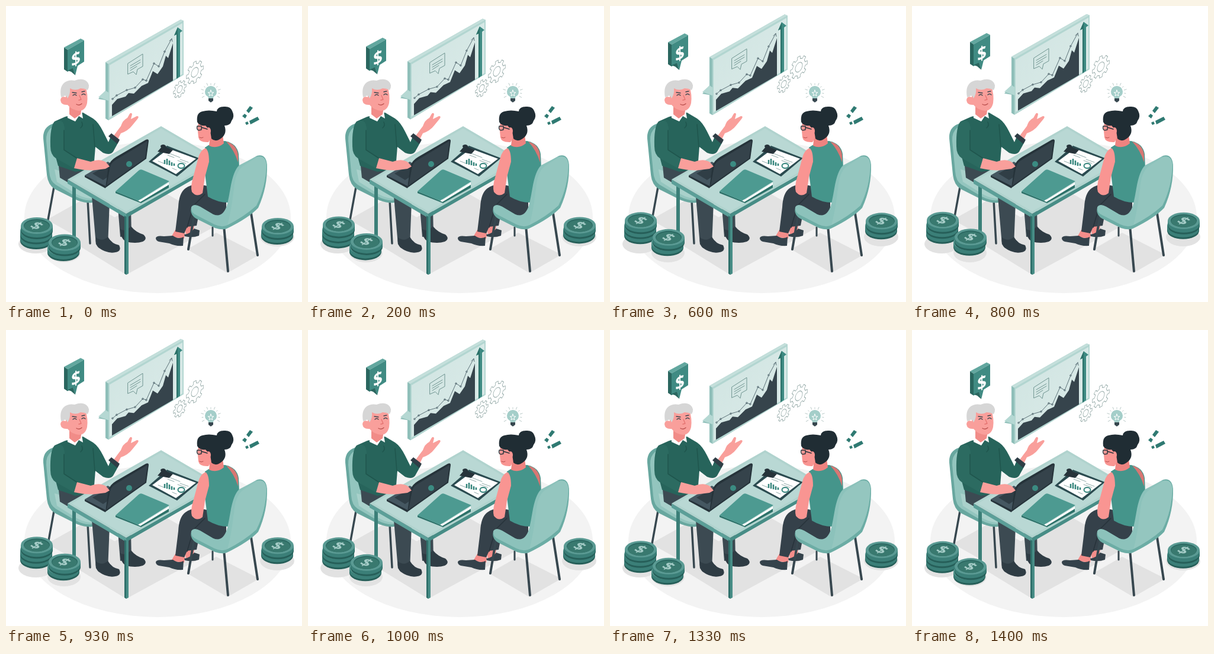
An HTML page for the animation above (1.47 s loop, 500 by 500 pixels).

```html
<!DOCTYPE html>
<html lang="en">
<head>
<meta charset="utf-8">
<title>Meeting</title>
<style>
  html, body { margin: 0; width: 100%; height: 100%; overflow: hidden; background: #fff; }
  svg { display: block; width: 100vw; height: 100vh; }
  text { font-family: "Open Sans", Arial, sans-serif; font-weight: 700; text-anchor: middle; }
  .line { fill: none; stroke-linecap: round; stroke-linejoin: round; }
</style>
</head>
<body>
<svg viewBox="0 0 500 500">
  <defs>
    <g id="coin">
      <path d="M-27 0v9a27 14 0 0 0 54 0v-9z" fill="#265f59"/>
      <path d="M-27 0v6a27 14 0 0 0 54 0v-6z" fill="#3b7f78"/>
      <ellipse rx="27" ry="14" fill="#5a9a93"/>
      <ellipse rx="22" ry="11" fill="#2b6962"/>
      <ellipse cy="1" rx="21" ry="10" fill="#39796f"/>
    </g>
    <g id="coinTop">
      <use href="#coin"/>
      <text transform="matrix(.95 .42 -.75 .55 0 0)" y="9" font-size="25" fill="#a3cbc6">$</text>
    </g>
    <linearGradient id="panel" x2="1" y2="1">
      <stop stop-color="#cfe4e1"/><stop offset="1" stop-color="#dcebe9"/>
    </linearGradient>
  </defs>

  <!-- floor and shadows -->
  <ellipse cx="256" cy="357" rx="225" ry="128" fill="#f3f3f3"/>
  <g fill="#e2e2e2">
    <path d="M69 361L130 327 202 367 142 402z"/>
    <path d="M112 398L262 312 361 368 203 454z"/>
    <path d="M306 411L355 383 428 420 374 451z"/>
    <ellipse cx="50" cy="402" rx="29" ry="16"/>
    <ellipse cx="98" cy="417" rx="28" ry="16"/>
    <ellipse cx="458" cy="390" rx="29" ry="16"/>
  </g>

  <!-- left chair -->
  <g class="line" stroke="#37474f" stroke-width="3.500">
    <path d="M81 306L71 361"/><path d="M138 328L142 401"/>
  </g>
  <path d="M63 224Q62 208 74 201L90 194 121 276 146 312V332Q137 334 120 328L82 309Q71 302 69 285z" fill="#68a79f"/>
  <path d="M68 228Q67 213 77 205L92 198 121 276 146 314V328Q134 330 118 322L84 302Q74 296 73 280z" fill="#93c5be"/>
  <path d="M82 276L120 286 146 312V326Q126 324 110 312L86 297z" fill="#a9d1cb"/>

  <!-- man: legs -->
  <path d="M89 270L150 276 176 306 172 405 152 403 145 322 108 300 91 290z" fill="#3c4a52"/>
  <path d="M189 340H211L212 388 193 390z" fill="#3c4a52"/>
  <path d="M152 391Q163 399 172 390Q179 402 191 404Q196 414 185 416Q171 419 156 408Q150 402 152 391z" fill="#2f3c44"/>
  <path d="M193 377Q203 382 211 372Q219 382 232 386Q240 393 231 398Q219 402 202 398Q193 392 193 377z" fill="#2f3c44"/>

  <!-- man: torso, arms, head -->
  <path d="M100 187L130 180 147 190Q156 196 164 212L173 230 177 220 191 228 181 246Q176 253 164 248L151 238 149 262 146 276 117 280 88 270 80 240Q73 205 82 195z" fill="#27645b"/>
  <path d="M147 200L150 238M128 196Q131 202 126 206" class="line" stroke="#1f554d" stroke-width="1.500"/>
  <path d="M104 181L112 172 128 178 130 190 123 186 117 195 104 189z" fill="#fff"/>
  <path d="M107 160L128 171 126 183 116 190 107 183z" fill="#f18c88"/>
  <path d="M101 139Q104 134 134 135Q139 150 137 164Q134 177 123 177Q110 175 104 167Q93 168 92 159Q93 151 101 154z" fill="#f99f9b"/>
  <path d="M93 154Q90 137 98 130Q105 124 116 126Q128 121 136 127Q143 133 138 142Q132 139 126 139Q117 144 108 139Q109 149 104 156Q101 149 97 153z" fill="#d6d6d6"/>
  <g class="line" stroke="#39464e" stroke-width="1.300">
    <path d="M113 151Q116 148 119 151M128 150Q131 147 134 150M112 146L119 147M128 145L133 144"/>
    <path d="M124 151L127 158 123 159" stroke="#e47370"/>
    <path d="M119 166Q124 169 128 165" stroke="#b94f4d"/>
  </g>
  <path d="M180 222Q187 212 194 203Q197 193 205 189L209 182Q212 179 213 183L211 191 221 186Q226 186 222 191L213 202Q206 211 194 215L188 227z" fill="#f99f9b"/>
  <path d="M173 220L178 215 192 226 188 233z" fill="#2f3e46"/>

  <!-- table -->
  <path d="M112 304h6v94l-3 2-3-2z" fill="#3b7f78"/>
  <path d="M104 293L203 351V358L104 300z" fill="#5b9f98"/>
  <path d="M203 351L361 261V267L203 358z" fill="#478d86"/>
  <path d="M262 203L361 261 203 351 104 293z" fill="#b0d3ce"/>
  <path d="M262 207L354 261 203 347 111 293z" fill="#b9d8d4"/>
  <path d="M200 354L203 356V454L200 452z" fill="#2f706a"/>
  <path d="M203 356L207 354V452L203 454z" fill="#478d86"/>

  <!-- laptop -->
  <path d="M133 286L172 263 203 281 168 307z" fill="#455761"/>
  <path d="M133 286L168 304V308L133 289z" fill="#26333a"/>
  <path d="M146 283L172 268 188 278 164 294z" fill="#303e46"/>
  <path d="M173 270Q176 261 186 255L236 226Q241 224 241 228L237 258 168 307z" fill="#26333a"/>
  <path d="M176 271Q178 264 187 259L239 228 235 257 170 303z" fill="#35434b"/>
  <ellipse cx="208" cy="267" rx="5" ry="5" fill="#3b8b82"/>

  <!-- left arm over the keyboard -->
  <path d="M82 196Q98 188 99 208L98 243 121 258 116 275 84 257Q75 251 75 237Q74 204 82 196z" fill="#2c6b61"/>
  <path d="M98 210L98 243 121 258" class="line" stroke="#1f554d" stroke-width="1.500"/>
  <path d="M120 257L143 263Q158 257 169 264L175 271 168 275 152 277Q138 279 115 274z" fill="#f99f9b"/>

  <!-- folder -->
  <path d="M185 313L226 330 275 301V307L228 333 185 316z" fill="#2d7169"/>
  <path d="M190 312L228 327 275 298V302L227 331z" fill="#fff"/>
  <path d="M185 313L224 278Q227 275 231 277L276 296 223 329z" fill="#4d9a91"/>

  <!-- clipboard -->
  <path d="M241 263L272 236 326 257 289 288z" fill="#2b4b50"/>
  <path d="M247 262L275 241 321 258 287 284z" fill="#fff"/>
  <path d="M256 246L262 239Q259 235 265 234Q270 234 271 239L282 243 276 250z" fill="#26333a"/>
  <g class="line" stroke="#35857c" stroke-width="2">
    <path d="M268 267V260M272 268V258M276 269V261M280 270V264M284 270V266" stroke-width="2.500" stroke-linecap="butt"/>
    <ellipse cx="296" cy="270" rx="5.500" ry="4"/>
  </g>
  <path d="M276 249L294 256M273 252L284 256M290 261L304 266M294 259L308 264M257 262L267 266M281 274L288 277" class="line" stroke="#8faaa9"/>

  <!-- woman: legs and shoes -->
  <path d="M286 378H303L301 393 279 390zM301 367H318L317 382 304 386z" fill="#f48d8a"/>
  <path d="M303 308Q316 298 340 304L372 330 372 360 350 360 327 345 322 371 306 373 301 384 286 381 291 340Q292 316 303 308z" fill="#35414a"/>
  <path d="M336 318L318 336Q312 352 306 374" class="line" stroke="#27323a" stroke-width="1.500"/>
  <path d="M253 392Q254 387 267 389L282 388Q291 395 300 390L299 405Q286 406 276 401L258 398Q253 396 253 392z" fill="#34424b"/>
  <path d="M301 386Q311 385 318 376L327 379 326 388Q315 392 302 389z" fill="#34424b"/>

  <!-- woman: body -->
  <path d="M336 239Q350 229 370 228Q390 232 393 250L394 275 379 332Q359 333 341 322L336 282z" fill="#45958b"/>
  <path d="M372 229Q390 234 392 252V264Q386 244 372 229z" fill="#d87673"/>
  <path d="M345 218H366L368 232Q356 242 343 236z" fill="#ee8380"/>
  <path d="M337 240Q343 244 343 263L336 289 332 316Q322 324 314 314Q311 305 317 286L325 256Q328 244 337 240z" fill="#f99592"/>

  <!-- woman: head -->
  <path d="M326 194Q322 207 324 211L325 222Q327 231 342 230L352 213 345 190z" fill="#f99592"/>
  <path d="M323 196Q321 180 332 178Q342 175 356 178Q357 170 368 170Q379 169 382 177Q387 187 381 194Q379 202 369 202Q374 215 364 223Q354 231 347 224L345 211 337 202Q327 203 323 196z" fill="#202d34"/>
  <ellipse cx="342" cy="211" rx="4" ry="6" fill="#f99592"/>
  <path d="M323 203Q321 212 330 209V203zM330 205L340 208" class="line" stroke="#26363d" stroke-width="1.400"/>
  <path d="M327 222Q330 224 333 222" class="line" stroke="#b94f4d"/>

  <!-- right chair -->
  <g class="line" stroke="#37474f" stroke-width="4">
    <path d="M318 352L308 411M368 371L375 448M414 350L425 421"/><path d="M349 374V388" stroke-width="3"/>
  </g>
  <path d="M313 340Q317 333 328 339L350 352Q368 360 375 335 378 322 380 311Q386 278 396 269L424 253Q439 249 441 268Q442 306 426 341Q410 358 373 376Q366 379 353 375L321 359Q310 352 313 340z" fill="#6cada5"/>
  <path d="M313 340Q317 333 328 339L350 352Q367 359 374 334 377 320 379 308Q384 278 394 269L421 255Q436 250 439 268Q439 305 423 337Q405 354 372 371Q363 374 352 369L321 353Q312 349 313 340z" fill="#8cc2bb"/>
  <path d="M386 300Q389 281 398 272L423 256Q438 250 440 268Q439 305 423 337Q402 356 374 370Q381 345 386 300z" fill="#94c6bf"/>

  <!-- bulb -->
  <g transform="translate(346 146)">
    <g id="rays" class="line" stroke="#b9c9c7"/>
    <path d="M-4 9H4V14L0 17 -4 14z" fill="#37474f"/>
    <path d="M-4 10Q-4 7-8 5A10 10 0 1 1 8 5Q4 7 4 10z" fill="#a4cec9"/>
    <path d="M0-4L1.500 0H5L2 2 3 6 0 4 -3 6 -2 2 -5 0H-1.500z" class="line" stroke="#fff"/>
  </g>

  <!-- accent strokes -->
  <g fill="#2f7a72">
    <path d="M406 177L412 169 417 172 410 181z"/><path d="M399 186L403 182 407 185 404 190z"/>
    <path d="M411 194L425 187 428 192 413 200z"/><path d="M404 197L408 195 410 199 406 201z"/>
  </g>

  <g id="floating">
    <!-- dollar bubble -->
    <path d="M98 70L126 55 132 58 104 74z" fill="#62a79f"/>
    <path d="M98 70L104 74V111L98 107z" fill="#2a665f"/>
    <path d="M104 74L132 58V94L121 101 117 117 113 106 104 111z" fill="#408b83"/>
    <path d="M104 109L113 105 117 117 110 111z" fill="#2a665f"/>
    <text transform="matrix(.88 -.42 0 1 118 89)" y="11" font-size="31" fill="#fff">$</text>

    <!-- board -->
    <path d="M168 95L295 23 300 25V116L173 193 168 190V159L156 157 168 143z" fill="#8fbfb9"/>
    <path d="M156 154L168 143 173 146V160z" fill="#b5d8d3"/>
    <path d="M168 95L295 23 300 25 173 98z" fill="#c4dfdb"/>
    <path d="M173 98L300 25V116L173 193z" fill="#b3d6d1"/>
    <path d="M175 100L298 29V115L175 188z" fill="url(#panel)"/>
    <path d="M179 167L188 157 202 153 207 147 216 148 229 135 240 130 248 110 256 115 265 102 270 84 274 88 282 63V126L179 186z" fill="#36444c"/>
    <g class="line" stroke="#5d7279">
      <path id="trend"/>
      <path d="M276 59L280 55 281 60"/>
      <path d="M206 97L231 81V102L222 107 220 116 215 111 206 115zM210 101L227 91M210 105L227 95M210 109L221 102" stroke="#6f9490"/>
    </g>
    <path d="M288 48L284 50 290 36 298 42 294 45V119L288 123z" fill="#3d8a82"/>
    <path d="M288 48L284 50 290 36V121L288 123z" fill="#2b7068"/>

    <!-- gears -->
    <g id="gears" fill="#fff" stroke="#94a9a7" stroke-linejoin="round"/>

    <!-- coins -->
    <use href="#coin" x="51" y="388"/><use href="#coin" x="51" y="379.500"/><use href="#coinTop" x="52" y="371"/>
    <use href="#coin" x="97" y="408"/><use href="#coinTop" x="99" y="399.500"/>
    <use href="#coin" x="458" y="380"/><use href="#coinTop" x="459" y="372"/>
  </g>
</svg>
<script>
  const $ = id => document.getElementById(id);
  const polar = (r, a) => `${(r * Math.cos(a)).toFixed(2)} ${(r * Math.sin(a)).toFixed(2)}`;

  // Toothed outline with a round hole, drawn on an isometric wall
  function gear(x, y, r) {
    const teeth = 8, step = 2 * Math.PI / teeth, points = [];
    for (let i = 0; i < teeth; i++) {
      for (const [k, o] of [[.76, -.28], [1, -.2], [1, .2], [.76, .28]]) {
        points.push(polar(r * k, (i + o) * step));
      }
    }
    return `<g transform="matrix(.8 -.46 0 1 ${x} ${y})">
      <path d="M${points.join("L")}z"/><circle r="${r * .42}"/></g>`;
  }
  $("gears").innerHTML = gear(319, 112, 18) + gear(293.5, 140.5, 13.5);

  let rays = "";
  for (let i = 0; i < 11; i++) {
    const a = (150 + i * 24) * Math.PI / 180;
    rays += `M${polar(13, a)}L${polar(i % 2 ? 15 : 17, a)}`;
  }
  $("rays").innerHTML = `<path d="${rays}"/>`;

  const trend = [[180, 157], [187, 151], [204, 142], [218, 138], [231, 124],
                 [237, 126], [250, 97], [258, 102], [268, 77], [280, 55]];
  const dots = trend.slice(0, -1).map(([x, y]) => `M${x - 1.3} ${y}a1.3 1.3 0 1 0 2.6 0a1.3 1.3 0 1 0-2.6 0`);
  $("trend").setAttribute("d", "M" + trend.join("L") + dots.join(""));

  const LOOP = 1470, STEPS = 22, LIFT = 9.4;
  const start = performance.now();
  function draw() {
    const t = (performance.now() - start) % LOOP;
    const step = Math.min(STEPS - 1, Math.floor((t + 6) / 66.7));
    const y = -LIFT * (1 - Math.cos(2 * Math.PI * step / STEPS)) / 2;
    $("floating").setAttribute("transform", `translate(0 ${y.toFixed(2)})`);
    requestAnimationFrame(draw);
  }
  draw();
</script>
</body>
</html>
```
